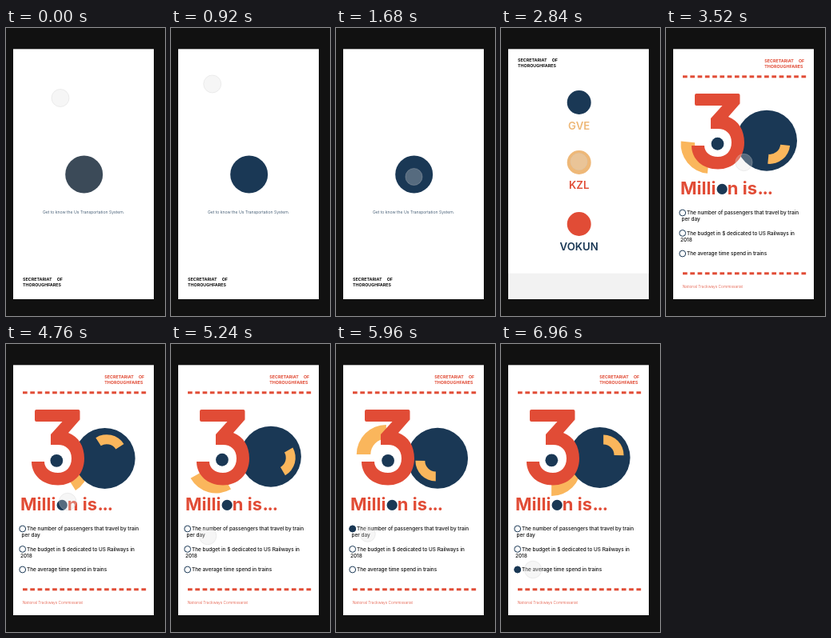
An HTML page with a canvas for the animation above (7000 ms loop, 199x360 px).

```html
<!DOCTYPE html>
<html lang="en">
<head>
<meta charset="utf-8">
<title>Transport quiz</title>
<style>
html, body { margin: 0; width: 100%; height: 100%; overflow: hidden; background: #111; }
canvas { display: block; width: 199px; height: 360px; }
</style>
</head>
<body>
<canvas id="stage"></canvas>
<script>
const LOOP = 7000, TAU = Math.PI * 2;
const NAVY = '#1a3855', RED = '#e14c36', TAN = '#fab65c', SAND = '#eeb878', INK = '#111111';
const canvas = document.getElementById('stage');
const c = canvas.getContext('2d');
const dpr = window.devicePixelRatio || 1;
canvas.width = Math.round(199 * dpr);
canvas.height = Math.round(360 * dpr);

const lerp = (a, b, k) => a + (b - a) * k;
const smooth = k => k * k * (3 - 2 * k);
const ramp = (t, a, b) => smooth(Math.min(1, Math.max(0, (t - a) / (b - a))));

// keys: rows of [time, value...]
function track(keys, t, ease = k => k) {
  if (t <= keys[0][0]) return keys[0].slice(1);
  for (let i = 1; i < keys.length; i++) {
    const a = keys[i - 1], b = keys[i];
    if (t <= b[0]) {
      const k = ease((t - a[0]) / (b[0] - a[0]));
      return a.slice(1).map((v, j) => lerp(v, b[j + 1], k));
    }
  }
  return keys[keys.length - 1].slice(1);
}

function mix(a, b, k) {
  const part = (s, i) => parseInt(s.slice(i, i + 2), 16);
  return 'rgb(' + [1, 3, 5].map(i => Math.round(lerp(part(a, i), part(b, i), k))).join(',') + ')';
}

// point on a circle, angle in degrees
function orbit(x, y, r, deg) {
  const a = deg * Math.PI / 180;
  return [x + r * Math.cos(a), y + r * Math.sin(a)];
}

function disc(x, y, r, color) {
  c.fillStyle = color;
  c.beginPath();
  c.arc(x, y, r, 0, TAU);
  c.fill();
}

function label(s, x, y, size, weight, color, align = 'left') {
  c.font = `${weight} ${size}px Inter, "Liberation Sans", sans-serif`;
  c.textAlign = align;
  c.fillStyle = color;
  c.fillText(s, x, y);
}

function faded(alpha, draw) {
  if (alpha <= 0) return;
  c.save();
  c.globalAlpha = alpha;
  draw();
  c.restore();
}

// quarter ring centred on an angle in degrees
function band([x, y], inner, outer, deg) {
  const mid = deg * Math.PI / 180, half = Math.PI / 4;
  c.fillStyle = TAN;
  c.beginPath();
  c.arc(x, y, outer, mid - half, mid + half);
  c.arc(x, y, inner, mid + half, mid - half, true);
  c.fill();
}

function heading(t) {
  const [x, y] = track([[1900, 21, 316], [2500, 21, 42.3], [2960, 21, 42.3], [3450, 123.3, 43]], t, smooth);
  const color = mix(INK, RED, ramp(t, 2960, 3400));
  label('SECRETARIAT', x, y, 5.35, 700, color);
  label('OF', x + 42.7, y, 5.35, 700, color);
  label('THOROUGHFARES', x, y + 6.9, 5.35, 700, color);
}

function intro(t) {
  faded(1 - ramp(t, 1720, 2000), () =>
    label('Get to know the Us Transportation System.', 97, 231.7, 5.15, 300, NAVY, 'center'));
}

function menu(t) {
  const open = ramp(t, 1800, 2450);
  const out = 1 - ramp(t, 2940, 3260);
  faded(ramp(t, 2200, 2600) * out, () => {
    c.fillStyle = '#f2f2f2';
    c.fillRect(9, 306.7, 176, 32.3);
  });
  const rows = [
    ['KZL', RED, 168, 201, SAND],
    ['VOKUN', NAVY, 245, 277.5, RED],
    ['GVE', SAND, 93, 126.5, NAVY]
  ];
  faded(out, () => {
    for (const [, , y, , fill] of rows) {
      if (open === 0 && fill !== NAVY) continue;
      const color = open === 0 ? mix('#3b4a58', NAVY, ramp(t, 0, 400)) : fill;
      disc(97.7, lerp(183, y, open), lerp(23.5, 15, open), color);
    }
  });
  faded(ramp(t, 2350, 2700) * out, () => {
    for (const [name, ink, , y] of rows) label(name, 97.7, y, 13.2, 600, ink, 'center');
  });
}

function three() {
  c.fillStyle = RED;
  c.beginPath();
  c.moveTo(38, 82);
  c.lineTo(90.5, 82);
  c.quadraticCurveTo(92.5, 82, 92.5, 84);
  c.lineTo(92.5, 94.5);
  c.lineTo(78, 111);
  c.bezierCurveTo(91, 116, 98, 128, 98, 143);
  c.bezierCurveTo(98, 163, 84, 176.5, 65, 176.5);
  c.bezierCurveTo(46, 176.5, 32, 164, 32, 147);
  c.lineTo(48, 147);
  c.bezierCurveTo(48, 155, 55, 161, 65, 161);
  c.bezierCurveTo(75, 161, 82, 154, 82, 143);
  c.bezierCurveTo(82, 132, 75, 126, 65, 126);
  c.lineTo(56, 126);
  c.lineTo(56, 113);
  c.lineTo(70.5, 97);
  c.lineTo(38, 97);
  c.quadraticCurveTo(36, 97, 36, 95);
  c.lineTo(36, 84);
  c.quadraticCurveTo(36, 82, 38, 82);
  c.fill();
}

function dashes(y, grow) {
  c.fillStyle = RED;
  for (let i = 0; i < 17 * grow; i++) c.fillRect(21 + i * 9.28, y, 5.7, 3);
}

function option(x, y, lines, picked) {
  c.strokeStyle = NAVY;
  c.lineWidth = 1;
  c.beginPath();
  c.arc(20.7, y, 3.9, 0, TAU);
  c.stroke();
  faded(picked, () => disc(20.7, y, 4.3, NAVY));
  label(lines[0], 26, y + 2.1, 6.43, 500, INK);
  if (lines[1]) label(lines[1], x, y + 10.2, 6.43, 500, INK);
}

function quiz(t) {
  const show = ramp(t, 3080, 3450);
  if (!show) return;
  const [turn] = track([[2960, -52], [4240, 182], [5240, 375], [5960, 495], [6960, 675], [7000, 682]], t);
  dashes(59.3, show);
  dashes(305.3, show);
  faded(show, () => {
    band(orbit(63, 145.5, 7.5, turn + 133), 19.5, 37, turn + 90);
    disc(...orbit(125.4, 142.4, 1.8, turn - 120), 38 * show, NAVY);
    band(orbit(126.5, 142.5, 3.8, turn - 20), 13.5, 25.5, turn);
    three();
    disc(...orbit(64.2, 145.6, 0.9, turn - 120), 7.9, NAVY);
    label('Milli', 18, 208, 22, 700, RED);
    disc(70.2, 201.4, 6.6, NAVY);
    label('n is', 76.8, 208, 22, 700, RED);
    c.letterSpacing = '-1.2px';
    label('...', 114.4, 208, 22, 700, RED);
    c.letterSpacing = '0px';
    const first = ramp(t, 5600, 5700) * (1 - ramp(t, 6440, 6540));
    option(19.6, 231, ['The number of passengers that travel by train', 'per day'], first);
    option(18, 256.4, ['The budget in $ dedicated to US Railways in', '2018'], 0);
    option(18, 282, ['The average time spend in trains'], ramp(t, 6680, 6780));
    label('National Trackways Commissariat', 20.7, 325.3, 4.8, 300, RED);
  });
}

function pointer(t) {
  const [x, y, r] = track([
    [0, 68, 87.5, 11], [640, 49, 63, 11], [820, 49, 63, 11], [1520, 97.5, 186, 11],
    [1620, 97.5, 186, 10.5], [1900, 97.5, 186, 11], [2500, 97.5, 167, 11],
    [2840, 97.5, 167, 10.5], [4240, 97.5, 169, 10.8], [4400, 97.5, 169, 10.8],
    [5240, 46, 240, 10.8], [5560, 39.5, 237.5, 9.8], [6200, 39.5, 237.5, 9.8],
    [6700, 40, 282, 10.8], [7000, 40, 282, 10.8]
  ], t, smooth);
  disc(x, y, r, 'rgba(225,225,225,0.3)');
  c.strokeStyle = 'rgba(200,200,200,0.5)';
  c.lineWidth = 0.6;
  c.beginPath();
  c.arc(x, y, r, 0, TAU);
  c.stroke();
}

function draw(t) {
  c.setTransform(dpr, 0, 0, dpr, 0, 0);
  c.fillStyle = '#111111';
  c.fillRect(0, 0, 199, 360);
  c.fillStyle = '#ffffff';
  c.fillRect(9, 26.3, 176, 312.7);
  intro(t);
  menu(t);
  quiz(t);
  heading(t);
  pointer(t);
}

const start = performance.now();
function tick() {
  draw((performance.now() - start) % LOOP);
  requestAnimationFrame(tick);
}
tick();
</script>
</body>
</html>
```
